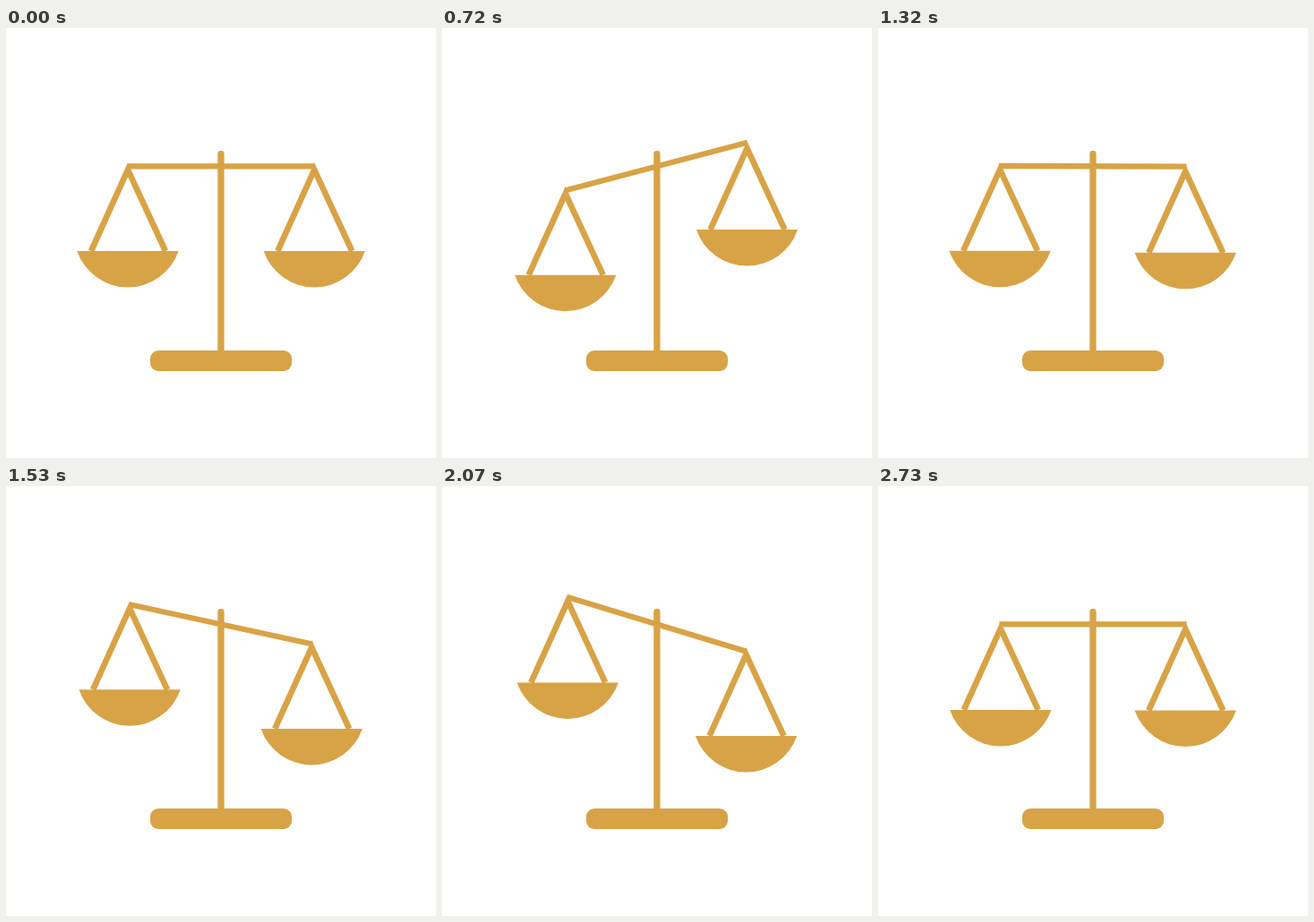
An HTML page for the animation above (3.6 s loop, 480 px wide and 480 px high).

```html
<!DOCTYPE html>
<html lang="en">
<head>
<meta charset="utf-8">
<title>Balance scale</title>
<style>
  html, body { margin: 0; width: 100%; height: 100%; overflow: hidden; background: #fff; }
  svg { display: block; width: 100vw; height: 100vh; }
</style>
</head>
<body>
<svg viewBox="0 0 480 480" fill="#d8a346">
  <defs>
    <g id="pan">
      <path d="M-41 249L0 158.2L42 249" fill="none" stroke="#d8a346" stroke-width="6.7"/>
      <path d="M-56.6 249H56.6A59.8 59.8 0 0 1-56.6 249Z"/>
    </g>
  </defs>
  <rect x="161" y="360" width="158" height="23" rx="9"/>
  <rect x="236.3" y="137" width="7.3" height="228" rx="3.4"/>
  <rect id="beam" x="135.5" y="151.2" width="209" height="6.3"/>
  <use id="left" href="#pan"/>
  <use id="right" href="#pan"/>
</svg>
<script>
const LOOP = 3600, STEP = 30, SWING = 900;
const byId = id => document.getElementById(id);
const beam = byId('beam'), left = byId('left'), right = byId('right');

const cubic = (a, b, t) => 3 * (1 - t) ** 2 * t * a + 3 * (1 - t) * t * t * b + t ** 3;

function bezier(x1, y1, x2, y2) {
  return x => {
    let low = 0, high = 1;
    for (let i = 0; i < 24; i++) {
      const mid = (low + high) / 2;
      if (cubic(x1, x2, mid) < x) low = mid; else high = mid;
    }
    return cubic(y1, y2, (low + high) / 2);
  };
}

// Each track: [from, to, bulge], the bulge bending the pan's path.
const swings = [
  { ease: bezier(1 / 6, 1 / 6, 2 / 3, 1), angle: [0, -16],
    lx: [0, 2.4, -1.5], ly: [0, 28.7, 0.6], rx: [0, -4, 0], ry: [0, -25.3, -2] },
  { ease: bezier(1 / 3, 0, 2 / 3, 1), angle: [-16, 20],
    lx: [2.4, 5, -3.5], ly: [28.7, -35.6, 0], rx: [-4, -6.2, 4], ry: [-25.3, 35, 0] },
  { ease: bezier(1 / 3, 0, 5 / 6, 5 / 6), angle: [20, 0],
    lx: [5, 0.8, 0], ly: [-35.6, 1, 0.6], rx: [-6.2, -1, 1.4], ry: [35, 1.5, 0.4] }
];

const along = ([from, to, bulge = 0], p) => from + (to - from) * p + bulge * 4 * p * (1 - p);

function place(pan, x, y) {
  pan.setAttribute('transform', `translate(${x.toFixed(3)} ${y.toFixed(3)})`);
}

function draw(now) {
  const time = Math.floor((now % LOOP) / STEP + 1e-4) * STEP;
  const index = Math.min(Math.floor(time / SWING), swings.length - 1);
  const swing = swings[index];
  const p = swing.ease(Math.min(time / SWING - index, 1));
  beam.setAttribute('transform', `rotate(${along(swing.angle, p).toFixed(3)} 240 154.3)`);
  place(left, 136 + along(swing.lx, p), along(swing.ly, p));
  place(right, 344.2 + along(swing.rx, p), along(swing.ry, p));
}

function tick() {
  draw(performance.now());
  requestAnimationFrame(tick);
}
draw(0);
requestAnimationFrame(tick);
</script>
</body>
</html>
```
